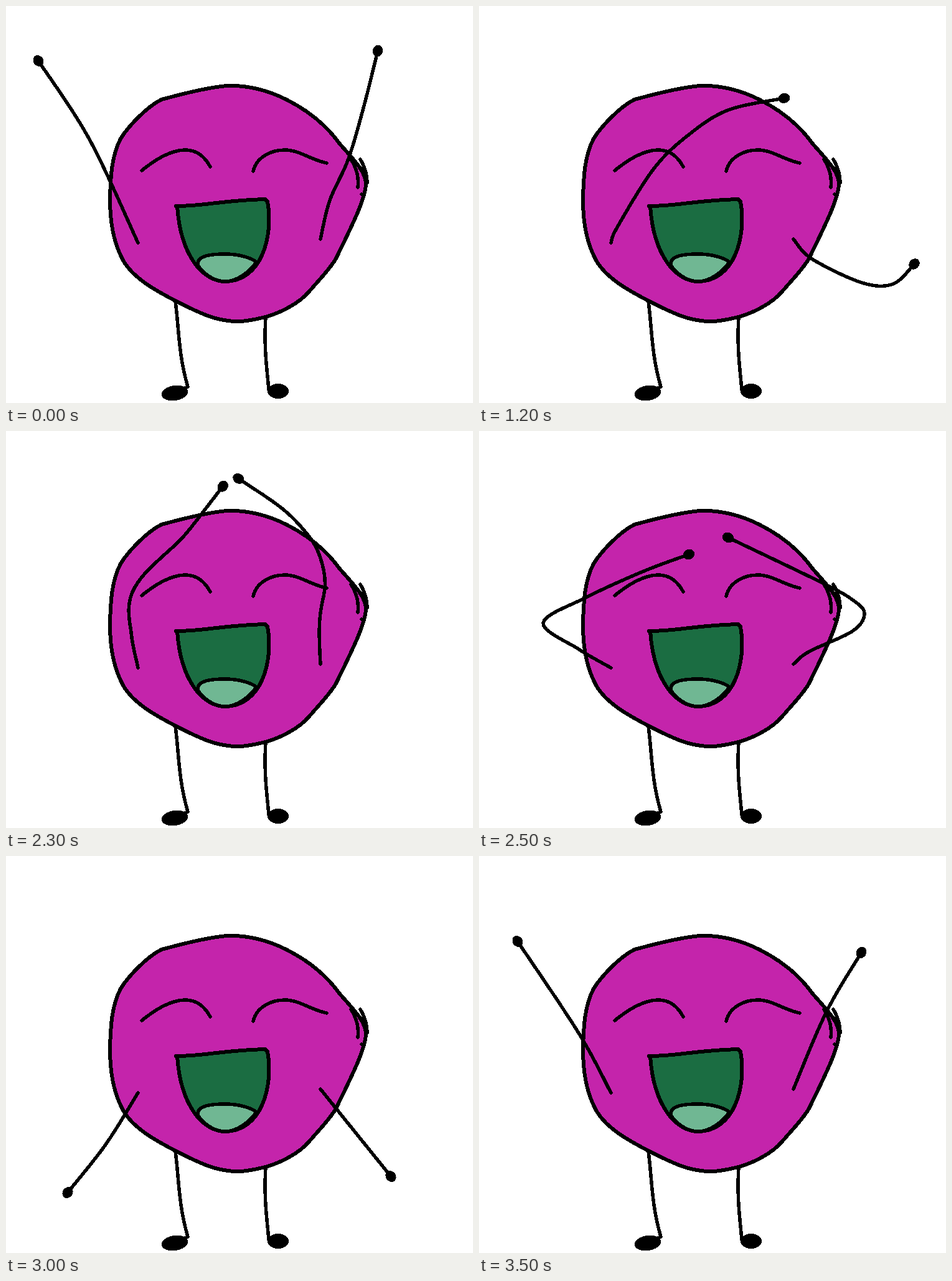
Write an HTML page that moves like this. It is 750x637 px and loops after 3.6 s.

```html
<!DOCTYPE html>
<html lang="en">
<head>
<meta charset="utf-8">
<title>Cheering blob</title>
<style>
  html, body { margin: 0; width: 100%; height: 100%; overflow: hidden; background: #fff; }
  svg { display: block; width: 100%; height: 100%; shape-rendering: crispEdges; }
  path { fill: none; stroke: #000; stroke-width: 5.5; stroke-linecap: round; stroke-linejoin: round; }
  .skin { fill: #c424ab; stroke-width: 6; }
  .mouth { fill: #1b6d42; stroke-width: 6; }
  .tongue { fill: #70b793; }
</style>
</head>
<body>
<svg viewBox="0 0 750 637">
  <!-- legs -->
  <path d="M272 474C278 520 277 560 292 611L276 618"/>
  <path d="M417 500C414 550 419 580 422 616"/>
  <ellipse cx="271" cy="621" rx="21.5" ry="12" transform="rotate(-8 271 621)"/>
  <ellipse cx="437" cy="618" rx="17" ry="12"/>

  <!-- body -->
  <path class="skin" d="M355 128C387 127 420 135 450 150S512 188 535 220C555 243 578 265 578 285
    C578 308 556 352 530 405C522 420 505 437 487 458C470 478 440 492 420 498C405 502 388 506 372 506
    C340 506 315 495 274 474C245 459 200 436 185 402C170 372 167 335 167 310C168 270 170 240 184 213
    C195 195 225 162 250 150C265 146 318 131 355 128Z"/>
  <path d="M556 246L574 264M554 246Q568 268 565 291M569 246Q580 264 580 284M571 302h0"/>

  <!-- face -->
  <path d="M218 264C245 242 268 231 288 231S320 243 328 258"/>
  <path d="M397 265C402 243 425 231 448 231S490 247 515 252"/>
  <path class="mouth" d="M273 321C320 321 345 312 416 310L420 314C430 370 410 442 352 442C316 442 280 400 275 321Z"/>
  <path class="tongue" d="M308 416C306 400 330 398 352 398S394 404 402 411C390 428 370 442 352 442S318 430 308 416Z"/>

  <g id="arms"></g>
</svg>
<script>
  const LOOP = 3600, STEP = 100, SAMPLES = 40;
  const SHOULDERS = { left: '212,380', right: '505,374' };

  // Each arm runs from its shoulder through these points to the hand.
  // A pose holds from `at` to `until`, then blends into the next one.
  const POSES = [
    { at: 0, until: 500, left: '134,214 52,88', right: '520,312 550,245 575,160 597,72' },
    { at: 600, until: 1100, left: '166,285 130,120 140,75 193,48 250,72 301,128',
      right: '518,265 522,160 485,90 422,55 385,80 360,127' },
    { at: 1200, until: 1700, left: '222,355 280,262 335,208 400,167 490,148',
      right: '535,406 615,444 665,446 699,414' },
    { at: 1800, until: 2200, left: '227,295 270,200 306,138 354,34', right: '480,240 443,146 405,85 360,29' },
    { at: 2500, until: 2500, left: '160,350 103,308 170,268 262,226 337,198',
      right: '530,354 600,321 619,293 600,271 550,243 400,171' },
    { at: 2800, until: 2800, left: '8,242', right: '708,235' },
    { at: 3000, until: 3200, left: '160,463 99,540', right: '618,514' },
    { at: 3300, until: 3300, left: '48,420', right: '684,415' },
    { at: 3500, until: LOOP, left: '160,284 62,137', right: '558,250 614,155' },
  ];

  const mix = (a, b, k) => a + (b - a) * k;
  const mixPoint = (p, q, k) => p.map((v, axis) => mix(v, q[axis], k));

  // Evenly sampled Catmull-Rom spline through the points.
  function sampleCurve(text) {
    const points = text.split(' ').map(pair => pair.split(',').map(Number));
    const last = points.length - 1;
    const at = i => points[Math.max(0, Math.min(last, i))];
    return Array.from({ length: SAMPLES + 1 }, (_, n) => {
      const u = n / SAMPLES * last, i = Math.min(Math.floor(u), last - 1), f = u - i;
      const [a, b, c, d] = [at(i - 1), at(i), at(i + 1), at(i + 2)];
      return b.map((v, k) => v + f / 2 * (c[k] - a[k]
        + f * (2 * a[k] - 5 * v + 4 * c[k] - d[k] + f * (3 * (v - c[k]) + d[k] - a[k]))));
    });
  }

  function addShape(name) {
    const shape = document.createElementNS('http://www.w3.org/2000/svg', name);
    return document.getElementById('arms').appendChild(shape);
  }

  const arms = Object.entries(SHOULDERS).map(([side, shoulder]) => {
    const hand = addShape('ellipse');
    hand.setAttribute('rx', 9.5);
    hand.setAttribute('ry', 8);
    return { line: addShape('path'), hand, curves: POSES.map(pose => sampleCurve(shoulder + ' ' + pose[side])) };
  });

  function draw(now) {
    const time = Math.floor(now % LOOP / STEP) * STEP;
    const index = POSES.findLastIndex(pose => pose.at <= time);
    const next = Math.min(index + 1, POSES.length - 1);
    const { until } = POSES[index];
    const blend = time > until ? (time - until) / (POSES[next].at - until) : 0;

    for (const { line, hand, curves } of arms) {
      const points = curves[index].map((p, n) => mixPoint(p, curves[next][n], blend));
      const [wrist, tip] = points.slice(-2);
      const angle = Math.atan2(tip[1] - wrist[1], tip[0] - wrist[0]) * 180 / Math.PI;
      line.setAttribute('d', 'M' + points.join('L'));
      hand.setAttribute('transform', `translate(${tip}) rotate(${angle})`);
    }
  }

  const start = performance.now();
  function tick() {
    draw(performance.now() - start);
    requestAnimationFrame(tick);
  }
  tick();
</script>
</body>
</html>
```
